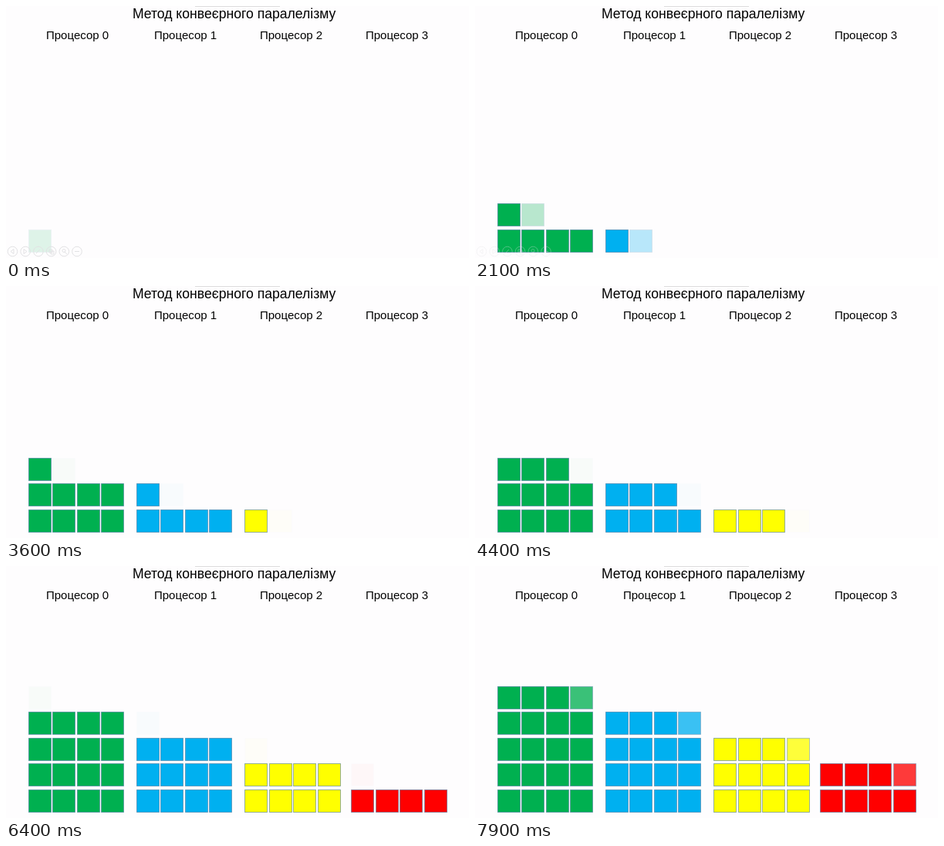
These frames come from a looping animation (600 px wide and 327 px high, 8000 ms). An HTML page:

```html
<!DOCTYPE html>
<html lang="uk">
<head>
<meta charset="utf-8">
<style>
  html, body { margin: 0; width: 100%; height: 100%; overflow: hidden; background: #fefdfe; }
  svg { display: block; width: 600px; height: 327px; }
  text { font: 15px "Liberation Sans", Arial, sans-serif; }
  .title { font-size: 17.6px; }
  #cells rect { stroke: #41719c; stroke-opacity: .55; }
  #nav { fill: none; stroke: #e2e2e4; }
</style>
</head>
<body>
<svg viewBox="0 0 600 327">
  <path d="M245 0H355" stroke="#bbb"/>
  <text class="title" x="163.9" y="15.5">Метод конвеєрного паралелізму</text>
  <text x="52" y="43">Процесор 0</text>
  <text x="192" y="43">Процесор 1</text>
  <text x="329" y="43">Процесор 2</text>
  <text x="466" y="43">Процесор 3</text>
  <g id="cells"></g>
  <g id="nav">
    <path d="M10 315.5v6l-4-3zM23 315.5v6l4-3zM39 321l5-5M56 316h4v4h-4zM58 318h4v4h-4zM76 319l3 3M89 318.5h6"/>
    <circle cx="75" cy="317.5" r="2"/>
  </g>
</svg>
<script>
const LOOP = 8000, FADE = 400, STAGES = 5, PER_ROW = 4;
const columns = [[29, '#00b050'], [169, '#00b0f0'], [309.5, '#ffff00'], [447.5, '#ff0000']];
const nav = document.getElementById('nav');
const group = document.getElementById('cells');
const cells = [];

function add(parent, tag, attrs) {
  const el = document.createElementNS('http://www.w3.org/2000/svg', tag);
  for (const name in attrs) el.setAttribute(name, attrs[name]);
  return parent.appendChild(el);
}

// Centre one-pixel outlines on whole pixels.
const snap = v => Math.floor(v) + .5;

for (let i = 0; i < 6; i++) add(nav, 'circle', { cx: 8.5 + 16.7 * i, cy: 318.5, r: 6.3 });

// Each processor starts one stage after its left neighbour.
columns.forEach(([x, fill], column) => {
  for (let row = 0; row + column < STAGES; row++) {
    for (let i = 0; i < PER_ROW; i++) {
      const el = add(group, 'rect', {
        x: snap(x + 31.5 * i), y: snap(290 - 33.4 * row), width: 29, height: 29, fill
      });
      cells.push({ el, order: (row + column) * PER_ROW + i });
    }
  }
});

function draw(now) {
  const t = Math.floor(now % LOOP / 100) * 100;
  const progress = Math.max(.12, t / FADE + .02);
  for (const { el, order } of cells) {
    el.style.opacity = Math.min(1, Math.max(0, progress - order));
  }
  nav.style.opacity = Math.max(0, 1 - t / 3200);
}

let start;
function tick(now) {
  start ??= now;
  draw(now - start);
  requestAnimationFrame(tick);
}
draw(0);
requestAnimationFrame(tick);
</script>
</body>
</html>
```
